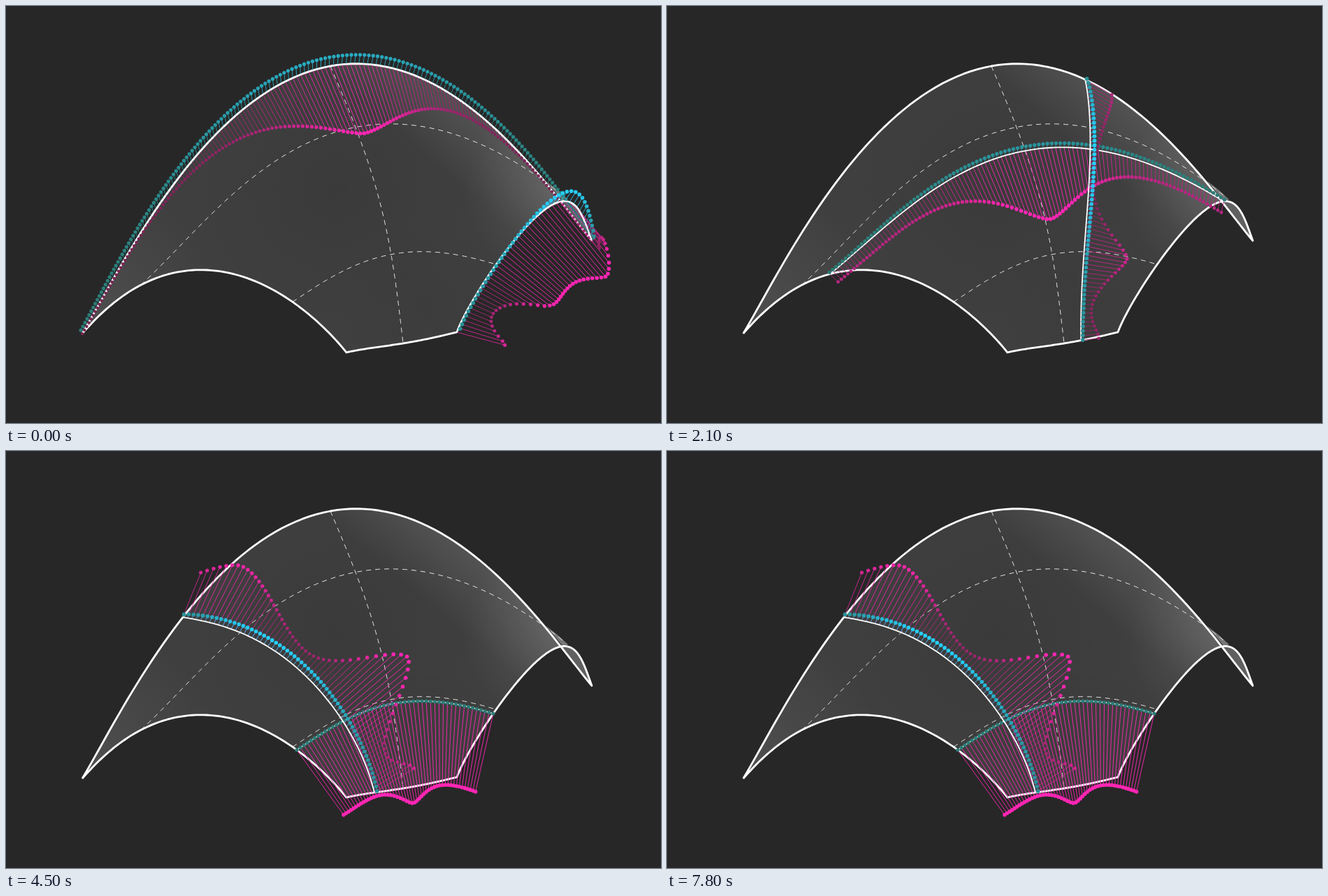
Animation, 937 px wide and 597 px high, one loop 8000 ms. Source, as an HTML page with a canvas:

```html
<!DOCTYPE html>
<html lang="en">
<head>
<meta charset="utf-8">
<title>Surface curvature combs</title>
<style>
html, body { margin: 0; width: 100%; height: 100%; overflow: hidden; background: #272727; }
canvas { display: block; }
</style>
</head>
<body>
<canvas id="stage" width="937" height="597"></canvas>
<script>
const ctx = document.getElementById('stage').getContext('2d');
const { PI, sin, cos, abs, max, min, exp } = Math;
const STEP = 300, LOOP = 8000, TURN = 20;

// Key points of the surface: one row per v, one column per u
const NET = [
  [[109, 469], [253, 238], [464, 86], [682, 160], [838, 336]],
  [[190, 401], [333, 259], [499, 171], [674, 194], [812, 284]],
  [[303, 379.4], [412, 307], [530, 263], [652, 264], [765, 296]],
  [[416, 428], [482, 387], [552, 362], [626, 360], [697, 376]],
  [[487, 496], [527, 489], [568, 483], [608, 475.5], [645, 467]]
];

const clamp = x => max(0, min(1, x));
const lerp = (a, b, t) => a + (b - a) * t;
const smooth = x => x * x * (3 - 2 * x);
const peak = (x, center, width) => exp(-(abs((x - center) / width) ** 1.6));
const polar = (p, deg, r) => [p[0] + r * cos(deg * PI / 180), p[1] + r * sin(deg * PI / 180)];

// Lagrange weights on five even nodes
function weights(x) {
  return [0, 1, 2, 3, 4].map(i => {
    let w = 1;
    for (let j = 0; j < 5; j++) if (j !== i) w *= (x * 4 - j) / (i - j);
    return w;
  });
}

function surf(u, v) {
  // lines flatten towards the front edge
  if (v > .75) v += sin(PI * (v - .75) * 4) * (.014 - .13 * (u - .5) ** 2);
  const wu = weights(u), wv = weights(v), p = [0, 0];
  NET.forEach((row, j) => row.forEach((q, i) => {
    p[0] += q[0] * wu[i] * wv[j];
    p[1] += q[1] * wu[i] * wv[j];
  }));
  return p;
}

const isoV = v => u => surf(u, v);
const isoU = u => v => surf(u, v);

function sample(curve, a = 0, b = 1, n = 90) {
  return Array.from({ length: n + 1 }, (_, i) => curve(lerp(a, b, i / n)));
}

function trace(pts, fresh = true) {
  if (fresh) ctx.beginPath();
  pts.forEach(([x, y], i) => fresh && !i ? ctx.moveTo(x, y) : ctx.lineTo(x, y));
}

function stroke(pts, width, color = '#fff', dash = []) {
  ctx.setLineDash(dash);
  ctx.lineWidth = width;
  ctx.strokeStyle = color;
  trace(pts);
  ctx.stroke();
  ctx.setLineDash([]);
}

// Parameters spaced evenly along the drawn length
function evenParams(curve, gap) {
  const n = 160, pts = sample(curve, 0, 1, n), sum = [0];
  for (let i = 1; i <= n; i++) {
    sum.push(sum[i - 1] + Math.hypot(pts[i][0] - pts[i - 1][0], pts[i][1] - pts[i - 1][1]));
  }
  const count = Math.round(sum[n] / gap), out = [];
  let j = 1;
  for (let i = 0; i <= count; i++) {
    const d = sum[n] * i / count;
    while (j < n && sum[j] < d) j++;
    out.push((j - 1 + (d - sum[j - 1]) / (sum[j] - sum[j - 1])) / n);
  }
  return out;
}

function mix(a, b, t) {
  return `rgb(${a.map((n, i) => Math.round(lerp(n, b[i], clamp(t))))})`;
}
const pink = t => mix([122, 36, 84], [255, 38, 180], t);
const blue = t => mix([44, 118, 108], [38, 208, 255], t);

function radial(x, y, r, tone, a) {
  const g = ctx.createRadialGradient(x, y, 0, x, y, r);
  g.addColorStop(0, `rgba(${tone},${tone},${tone},${a})`);
  g.addColorStop(1, `rgba(${tone},${tone},${tone},0)`);
  ctx.fillStyle = g;
  ctx.fillRect(x - r, y - r, 2 * r, 2 * r);
}

function drawSurface() {
  const back = sample(isoV(0)), right = sample(isoU(1));
  const front = sample(isoV(1)).reverse(), left = sample(isoU(0)).reverse();
  const rim = [...back, ...right, ...front, ...left];
  ctx.fillStyle = '#272727';
  ctx.fillRect(0, 0, 937, 597);

  ctx.save();
  trace(rim);
  ctx.clip();
  ctx.fillStyle = '#3f3f3f';
  ctx.fillRect(0, 0, 937, 597);
  radial(470, 260, 200, 0, .08);
  radial(600, 430, 130, 0, .05);
  radial(120, 440, 190, 255, .08);
  radial(795, 262, 140, 255, .12);
  const g = ctx.createLinearGradient(720, 185, 655, 262);
  g.addColorStop(0, 'rgba(255,255,255,.11)');
  g.addColorStop(1, 'rgba(255,255,255,0)');
  ctx.fillStyle = g;
  ctx.fillRect(0, 0, 937, 597);
  ctx.restore();

  // underside seen past the fold
  ctx.fillStyle = '#606060';
  trace(sample(isoV(0), .92, 1, 20));
  trace(sample(isoU(1), 0, .33, 20), false);
  ctx.fill();
  ctx.fillStyle = '#777';
  trace([[772, 250], [790, 264], [804, 277], [798, 281]]);
  ctx.fill();

  const dash = [7, 6];
  stroke(sample(isoU(.5)), 1, '#e4e4e4', dash);
  stroke(sample(isoV(.257), 0, .965), 1, '#e4e4e4', dash);
  stroke(sample(isoV(.735)), 1, '#e4e4e4', dash);
  ctx.lineJoin = 'round';
  stroke([...rim, rim[0]], 2.8);
}

// Comb rules: q is the sweep progress, x the place along the curve

function acrossPink(q) {
  const level = 115 * exp(-(((q - .77) / (q < .77 ? .3 : .23)) ** 2));
  const crest = 105 * cos(PI * q * .54);
  const spread = 30 - 18 * q ** 4;
  const glow = .3 * sin(PI * q * 1.35);
  return x => {
    const len = level + crest * peak(x, .51, .15);
    const t = clamp(len / 105 + glow);
    return { len, dir: 68 + 14 * q + spread * (2 * x - 1), color: pink(t), size: 2.2 + .6 * t };
  };
}

function acrossTeal(q, curve) {
  const lift = 13 * max(0, 1 - q / .68);
  return x => {
    const a = curve(x - .005), b = curve(x + .005), arch = sin(PI * x);
    const normal = Math.atan2(b[1] - a[1], b[0] - a[0]) * 180 / PI - 90;
    return {
      len: lift * (.4 + .6 * arch),
      dir: lerp(normal, -75, .5),
      color: blue(.08 + .04 * lift * arch ** 3),
      size: 2.6
    };
  };
}

// The lengthwise comb calms down near the middle of the surface
function downPink(q) {
  const far = abs(q - .45), wake = smooth(clamp(far / .28));
  const center = .45 * clamp((far - .15) / .28) ** 2;
  const hump = 20 + 240 * far;
  const crest = (30 + 110 * wake) * (1 - 1.4 * center * (1 - .6 * q));
  const tail = 8 + 55 * wake;
  const start = -15 + 60 * cos(PI * clamp((q - .2) / .65)), end = 15 - 62 * q;
  return x => {
    const len = hump * peak(x, center, .28) + crest * peak(x, .73, .12) + tail * peak(x, 1, .07);
    const t = clamp(len / 105);
    const dir = lerp(start, end, x) + 24 * (.8 - q) * sin(PI * x);
    return { len, dir, color: pink(t), size: 2.2 + .6 * t };
  };
}

function downBlue(q) {
  const far = abs(q - .45), lift = 6 + 55 * far * far;
  return x => {
    const arch = sin(PI * x ** .7);
    return {
      len: lift * (.4 + .6 * arch),
      dir: -5 - far * lerp(130 + 110 * q, 90, x),
      color: blue(.3 + .7 * arch ** 2),
      size: 2.8
    };
  };
}

function comb(curve, gap, rules) {
  const params = evenParams(curve, gap);
  const teeth = rules.flatMap(rule => params.map(x => {
    const tooth = rule(x), base = curve(x);
    return { ...tooth, base, tip: polar(base, tooth.dir, tooth.len) };
  }));
  for (const { base, tip, color } of teeth) stroke([base, tip], .9, color);
  stroke(sample(curve), 1.8);
  for (const { tip, color, size } of teeth) {
    ctx.fillStyle = color;
    ctx.beginPath();
    ctx.arc(tip[0], tip[1], size, 0, 2 * PI);
    ctx.fill();
  }
}

function draw(q) {
  const across = isoV(q), down = isoU(1 - q);
  drawSurface();
  comb(across, 6.1, [acrossPink(q), acrossTeal(q, across)]);
  comb(down, 6.5, [downPink(q), downBlue(q)]);
}

let shown = -1;
function tick() {
  const i = Math.floor(performance.now() % LOOP / STEP);
  const k = i <= TURN ? i : 2 * TURN + 1 - i;
  if (k !== shown) draw((shown = k) / TURN);
  requestAnimationFrame(tick);
}
tick();
</script>
</body>
</html>
```
